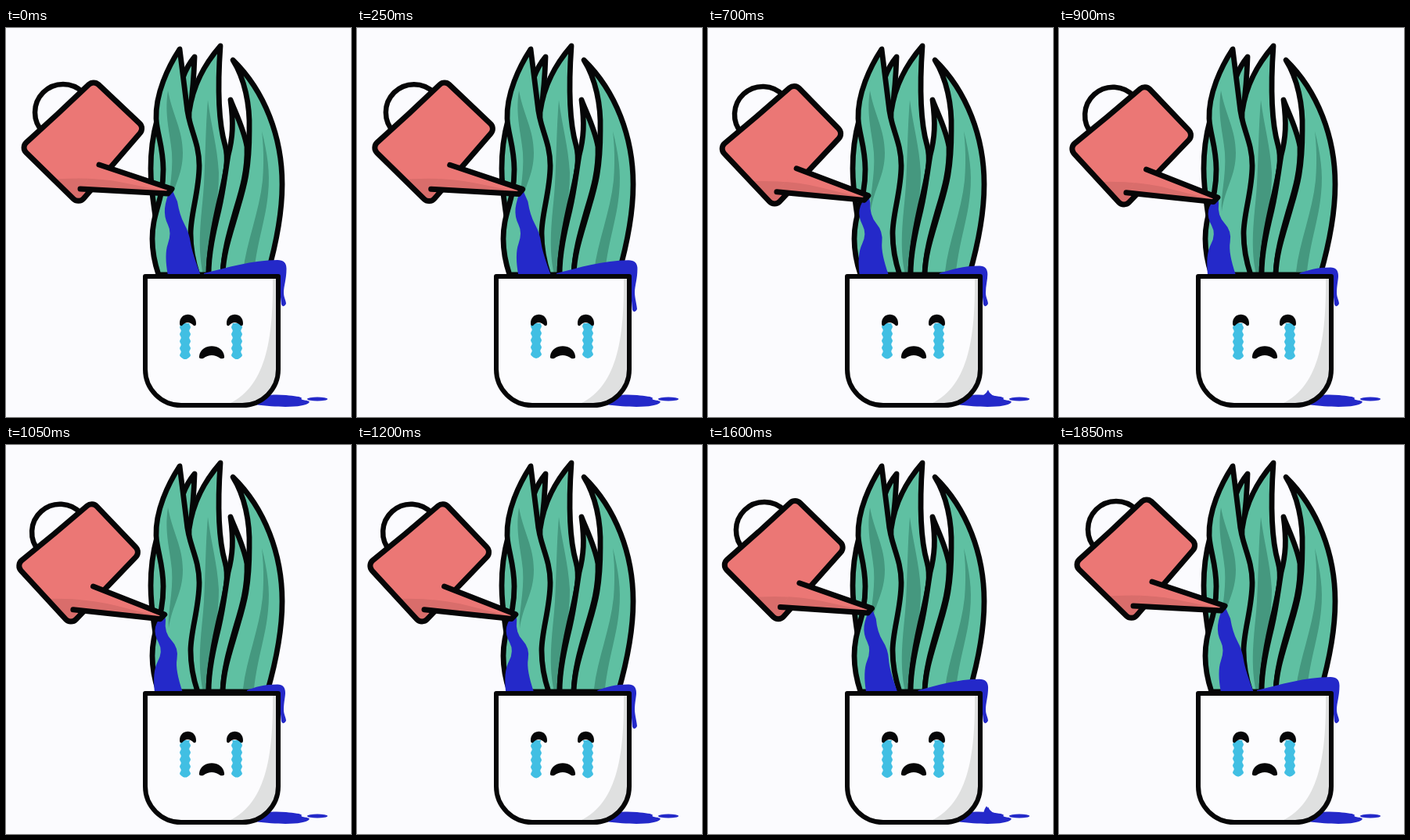
Write an HTML page with a canvas that moves like this. It is 441 px wide and 498 px high and loops after 1900 ms.

```html
<!DOCTYPE html>
<html lang="en">
<head>
<meta charset="utf-8">
<title>Overwatered plant</title>
<style>
html, body { margin: 0; width: 100%; height: 100%; overflow: hidden; background: #fbfbfe; }
canvas { display: block; }
</style>
</head>
<body>
<canvas id="stage" width="441" height="498"></canvas>
<script>
const ctx = document.getElementById('stage').getContext('2d');
const LOOP = 1900, STEP = 50, DRIP = 950;
const INK = '#060607', WATER = '#2429c9', GREEN = '#5fc0a2', SHADE = '#45987f';
const RED = '#eb7775', DARK_RED = '#d96d6b', TEAR = '#41bfe3', PAPER = '#fcfcfe';
const P = d => new Path2D(d);

// Each leaf: outline, then an optional darker vein.
const leaves = [
  ['M193 118C187 140 185 160 185 180C185 208 189 225 192 250L204 220L204 150Z'],
  ['M241 37Q231 49 226 64L228 110L235 108Q240 72 241 37Z'],
  ['M274 23C254 46 239 72 234 108L232 316H259C259 285 267 245 275 212C281 185 285 168 280 150C272 122 270 80 274 23Z',
   'M258 92C262 125 270 150 272 185C272 225 263 260 259 312L252 316C243 275 251 235 253 200C255 165 255 128 258 92Z'],
  ['M287 92C291 122 290 140 284 163C280 187 278 207 272 233C265 262 259 288 259 316H277C278 286 286 260 294 232C302 206 309 182 308 152C304 129 293 108 287 92Z'],
  ['M290 41C305 65 312 98 311 131C311 182 304 204 296 231C287 263 278 286 277 316H334C342 288 353 245 353 200C353 140 331 81 290 41Z',
   'M327 132C334 160 338 185 335 212C332 245 322 270 317 312L303 312C307 275 324 235 328 195C330 170 329 150 327 132Z'],
  ['M222 27C207 50 191 84 192 116C193 136 201 152 201 181C201 224 187 235 187 270C187 289 191 304 195 316H245C239 298 236 284 236 263C236 238 247 208 247 176C247 145 233 127 231 99C228 76 225 52 222 27Z',
   'M207 80C213 112 226 130 226 160C226 190 212 205 208 235C206 215 214 190 212 160C210 135 202 112 207 80Z']
].map(l => l.map(P));

const pot = P('M178 318H348V437A46 46 0 0 1 302 483H224A46 46 0 0 1 178 437Z');
const potShade = P('M341 318C342 400 332 462 281 483H302A46 46 0 0 0 348 437V318Z');
const eye = P('M222 378C222 363 243 363 243 378Q243 382 240 381Q232 373 225 381Q222 382 222 378Z');
const mouth = P('M247 420C249 403 277 403 279 420Q280 424 274 423Q263 415 252 423Q246 424 247 420Z');
const puddle = P('M318 478C330 468 345 469 358 470C368 471 378 472 378 474C374 477 392 476 387 480C382 485 355 487 318 482Z');
const handle = P('M37 108A36 36 0 1 1 109 108A36 36 0 1 1 37 108Z');
const spoutFill = P('M119 175L212 206L208 212L95 206Z');
const spoutLine = P('M95 206L207 212L212 206L119 175');
const canShade = P('M50 195Q105 189 150 198L210 210L100 207L94 232Z');
const body = new Path2D();
body.moveTo(66, 110);
[[112, 66.5, 177, 128], [177, 128, 93, 225.5], [93, 225.5, 19, 153], [19, 153, 112, 66.5]]
  .forEach(c => body.arcTo(...c, 9));
body.closePath();

// Stream edge with the can raised and tipped down.
const streamUp = [[211, 204], [204, 220], [202, 242], [212, 262], [202, 290], [207, 317],
  [249, 317], [238, 288], [234, 262], [222, 240], [219, 222]];
const streamDown = [[203, 214], [193, 224], [189, 242], [201, 264], [187, 290], [190, 317],
  [226, 317], [216, 288], [221, 260], [202, 240], [204, 224]];

const mix = (a, b, p) => a + (b - a) * p;
const clamp = v => Math.min(1, Math.max(0, v));
const ease = v => (1 - Math.cos(Math.PI * clamp(v))) / 2;

function fill(path, color) { ctx.fillStyle = color; ctx.fill(path); }
function line(path, width) { ctx.strokeStyle = INK; ctx.lineWidth = width; ctx.stroke(path); }
function fillInside(shape, path, color) {
  ctx.save();
  ctx.clip(shape);
  fill(path, color);
  ctx.restore();
}

function drawStream(p) {
  const pts = streamUp.map((a, i) => a.map((v, k) => mix(v, streamDown[i][k], p)));
  const path = new Path2D();
  path.moveTo(...pts[0]);
  const side = (from, to) => {
    for (let i = from; i < to; i++) {
      const a = pts[i], b = pts[i + 1];
      const end = i === to - 1 ? b : [(a[0] + b[0]) / 2, (a[1] + b[1]) / 2];
      path.quadraticCurveTo(a[0], a[1], end[0], end[1]);
    }
  };
  side(1, 5);
  path.lineTo(...pts[6]);
  side(7, 10);
  path.closePath();
  fill(path, WATER);
}

function drawOverflow(p, age) {
  const x = mix(253, 308, p), y = mix(297, 306.5, p), edge = mix(358.5, 357, p);
  const s = 7 * ease((age - 160) / 90) * (1 - ease((age - 290) / 80));
  fill(P(`M${x} 314C${mix(282, 318, p)} ${mix(307, 310, p)} ${mix(315, 330, p)} ${y} 347 ${y}
    Q${edge} ${y} ${edge} ${y + 11}C${edge} 322 355 330 355 339C355 345 358 ${349 + s} 358 ${353 + s}
    Q355 ${359 + s} 352 ${354 + s}L349 325V318H${x}Z`), WATER);
}

function drawDrop(age) {
  const fall = age - 310;
  if (fall > 0) {
    const y = 362 + 0.00092 * fall * fall;
    if (y < 470) fill(P(`M356 ${y - 6}Q360 ${y} 359 ${y + 2}A3.2 3.2 0 0 1 353 ${y + 2}Q352 ${y} 356 ${y - 6}Z`), WATER);
  }
  const up = Math.sin(Math.PI * clamp((age - 600) / 150));
  if (up > 0.01) fill(P(`M342 473Q354 472 358 ${471 - 9 * up}Q361 472 374 473Z`), WATER);
}

function drawTear(x, t) {
  const end = 424.3 - 2 * Math.cos(2 * Math.PI * (t - 400) / LOOP);
  ctx.beginPath();
  for (let y = 378; y < end; y += 0.5) {
    const wave = 6.1 + 0.8 * Math.cos(2 * Math.PI * (y - end + 5) / 9);
    const d = clamp((end - y) / 5);
    const w = wave * Math.sqrt(d * (2 - d));
    ctx.rect(x - w, y, 2 * w, 0.6);
  }
  ctx.fillStyle = TEAR;
  ctx.fill();
}

function drawCan(p) {
  ctx.save();
  ctx.translate(0, 36);
  ctx.rotate(p * 0.053);
  ctx.translate(0, -36);
  line(handle, 6.5);
  fill(body, RED);
  fillInside(body, canShade, DARK_RED);
  line(body, 7);
  fill(spoutFill, RED);
  fillInside(spoutFill, canShade, DARK_RED);
  line(spoutLine, 7);
  ctx.restore();
}

function drawPot(t) {
  fill(pot, PAPER);
  fill(potShade, '#dfe0e0');
  line(pot, 6);
  drawTear(229, t);
  drawTear(295, t);
  fill(eye, INK);
  ctx.save();
  ctx.translate(60, 0);
  fill(eye, INK);
  ctx.restore();
  fill(mouth, INK);
}

function draw(t) {
  const p = t < 1050 ? ease((t - 150) / 800) : 1 - ease((t - 1150) / 700);
  const age = t % DRIP;
  ctx.fillStyle = '#fbfbfe';
  ctx.fillRect(0, 0, 441, 498);
  ctx.lineJoin = ctx.lineCap = 'round';
  fill(puddle, WATER);
  fill(P('M385 475A13 2.6 0 0 1 411 475A13 2.6 0 0 1 385 475Z'), WATER);
  for (const [shape, vein] of leaves) {
    fill(shape, GREEN);
    if (vein) fillInside(shape, vein, SHADE);
    line(shape, 6.8);
  }
  drawStream(p);
  drawOverflow(p, age);
  drawDrop(age);
  drawPot(t);
  drawCan(p);
}

const start = performance.now();
function tick() {
  const t = (performance.now() - start) % LOOP;
  draw(Math.floor(t / STEP) * STEP);
  requestAnimationFrame(tick);
}
tick();
</script>
</body>
</html>
```
